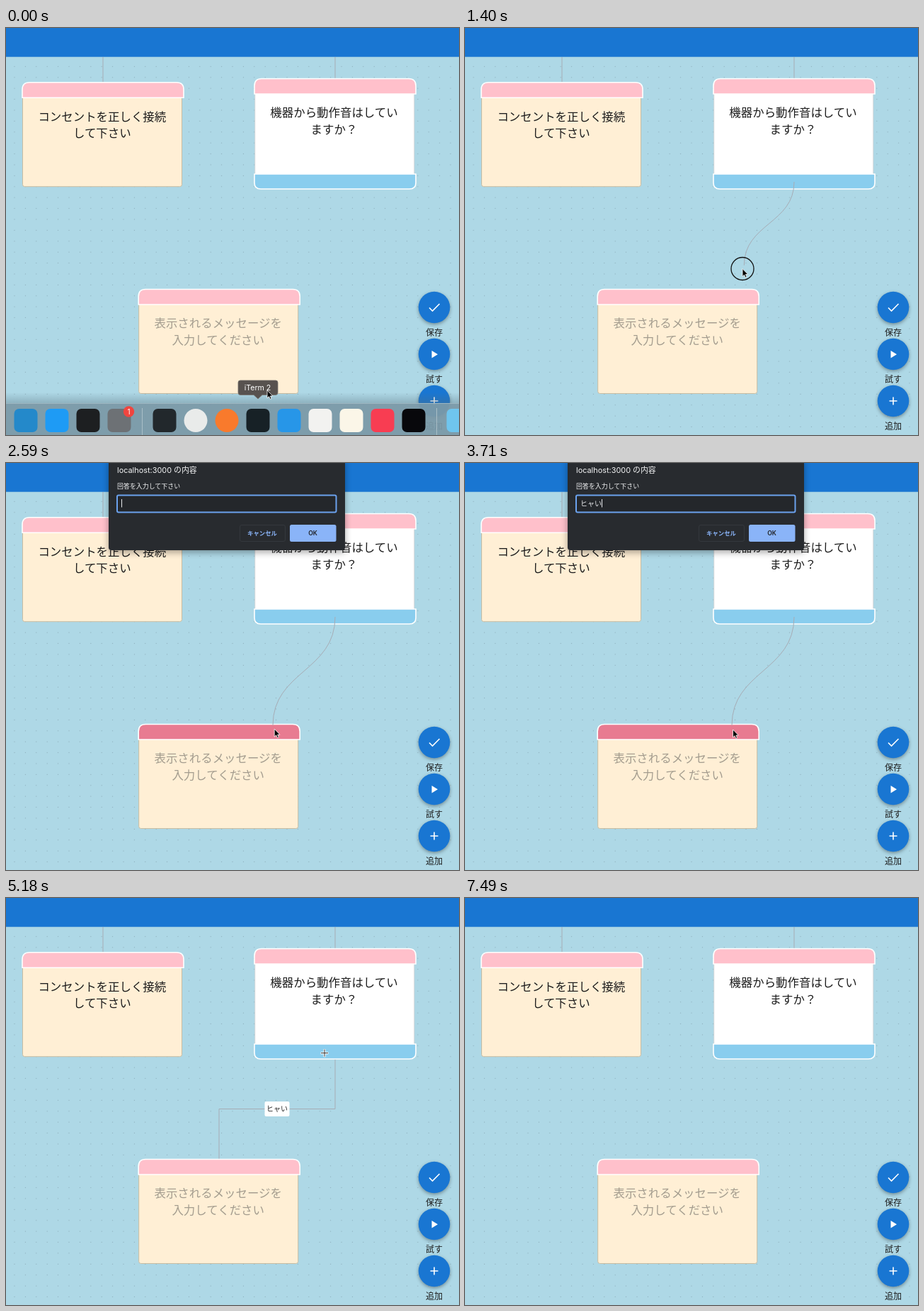
These frames come from a looping animation (640 px wide and 574 px high, 7560 ms). An HTML page:

```html
<!DOCTYPE html>
<html lang="ja">
<head>
<meta charset="utf-8">
<style>
  html, body { margin: 0; width: 100%; height: 100%; overflow: hidden; background: #aed8e6; }
  svg { display: block; width: 640px; height: 574px; font-family: "Noto Sans CJK JP", "Noto Sans CJK", sans-serif; }
  .msg { font-size: 16.45px; font-weight: 350; text-anchor: middle; fill: #1c1c1c; }
  .hint { fill: #a39c8e; }
  .line { fill: none; stroke: #a6acb5; stroke-width: 1; }
  .cap { fill: #ffc0cb; stroke: #fff; stroke-width: 1.6; }
  .cap.hover { fill: #e87b91; }
  .body { fill: #ffefd5; stroke: #c9bda2; stroke-width: 1; }
  .fab { fill: #1976d2; filter: drop-shadow(0 2.5px 2.5px rgba(0, 0, 0, .35)); }
  .small { font-size: 12px; text-anchor: middle; fill: #1c1c1c; }
</style>
</head>
<body>
<svg viewBox="0 0 640 574">
  <defs>
    <pattern id="dots" width="15.4" height="15.4" patternUnits="userSpaceOnUse">
      <circle cx="12" cy="8" r=".65" fill="#88a8b5"/>
    </pattern>
    <linearGradient id="shade" x2="0" y2="1">
      <stop offset="0" stop-color="#546c78" stop-opacity="0"/>
      <stop offset="1" stop-color="#546c78" stop-opacity=".35"/>
    </linearGradient>
    <path id="cap" d="M0 21.5V10Q0 0 10 0H218Q228 0 228 10V21.5Z"/>
  </defs>

  <rect width="640" height="574" fill="#aed8e6"/>
  <rect width="640" height="574" fill="url(#dots)"/>
  <path class="line" d="M137 41V78M465 41V73"/>
  <g id="edge">
    <path class="line" d="M465 217V297.5H301V370"/>
    <rect x="365.5" y="287" width="35" height="21" rx="2" fill="#fff"/>
    <text x="383" y="300.5" font-size="10" text-anchor="middle" fill="#222">ヒャい</text>
  </g>

  <g transform="translate(23 76.7)">
    <rect class="body" x=".5" y="15" width="225" height="132" rx="3"/>
    <use href="#cap" class="cap"/>
    <text class="msg" x="112.8" y="53.9">コンセントを正しく接続</text>
    <text class="msg" x="112.8" y="77.2">して下さい</text>
  </g>
  <g transform="translate(351 71.5)">
    <rect x=".8" y="15" width="225" height="125" fill="#fff" stroke="#d2d2d2" stroke-width=".8"/>
    <use href="#cap" class="cap"/>
    <path d="M0 134.5H228V147Q228 155.5 219 155.5H9Q0 155.5 0 147Z" fill="#89cdee" stroke="#fff" stroke-width="1.6"/>
    <text class="msg" x="112.5" y="53.6">機器から動作音はしてい</text>
    <text class="msg" x="112.5" y="77">ますか？</text>
  </g>
  <g transform="translate(187.2 368.5)">
    <rect class="body" x=".5" y="15" width="225" height="132" rx="3"/>
    <use href="#cap" class="cap" id="target"/>
    <text class="msg hint" x="112.5" y="53.9">表示されるメッセージを</text>
    <text class="msg hint" x="112.5" y="77.2">入力してください</text>
  </g>
  <path class="line" id="wire"/>

  <rect width="640" height="40.7" fill="#1976d2"/>

  <g fill="none" stroke="#fff" stroke-width="1.6">
    <circle class="fab" cx="605" cy="394" r="22.3" stroke="none"/>
    <path d="M598 394.5L602.5 399L612.5 389"/>
    <circle class="fab" cx="605" cy="460" r="22.3" stroke="none"/>
    <path d="M601.5 455V465.5L610 460.2Z" fill="#fff" stroke="none"/>
    <circle class="fab" cx="605" cy="526" r="22.3" stroke="none"/>
    <path d="M605 520.5V531.5M599.5 526H610.5"/>
  </g>
  <text class="small" x="605" y="433.8">保存</text>
  <text class="small" x="605" y="499.8">試す</text>
  <text class="small" x="605" y="565.8">追加</text>

  <g id="dialog">
    <path d="M145 -5H479V119Q479 123 475 123H149Q145 123 145 119Z" fill="#282b2f" style="filter:drop-shadow(0 3px 5px rgba(0,0,0,.35))"/>
    <text x="157" y="14.3" font-size="10.9" fill="#f4f5f6" font-family="Inter, 'Noto Sans CJK JP', sans-serif">localhost:3000 の内容</text>
    <text x="157" y="35.5" font-size="8.95" fill="#f4f5f6">回答を入力して下さい</text>
    <rect x="157" y="45.5" width="309.5" height="24" rx="2" fill="#24272b" stroke="#6ba2ee" stroke-width="2"/>
    <text id="typed" x="163" y="61" font-size="10" fill="#e8eaed"></text>
    <path id="mark" stroke="#e8eaed"/>
    <path id="caret" stroke="#e8eaed"/>
    <rect x="330.5" y="87.5" width="64" height="23" rx="2.5" fill="none" stroke="#34383d"/>
    <text x="362" y="102" font-size="8.4" font-weight="700" text-anchor="middle" fill="#8ab4f8">キャンセル</text>
    <rect x="401" y="87" width="65.5" height="24" rx="2.5" fill="#8ab4f8"/>
    <text x="433.5" y="102" font-size="8.6" font-weight="600" text-anchor="middle" fill="#202124" font-family="Inter, sans-serif">OK</text>
  </g>

  <g id="dock">
    <rect y="514" width="640" height="15" fill="url(#shade)"/>
    <rect y="529" width="640" height="60" fill="#7c9aa8" fill-opacity=".94"/>
    <path d="M0 529.5H640" stroke="#9db6c1"/>
    <path d="M192.5 536V574M608.5 536V574" stroke="#a9bec7"/>
    <g id="apps"></g>
    <circle cx="173.5" cy="541" r="7.7" fill="#f0453f"/>
    <text x="173.5" y="544.8" font-size="10" text-anchor="middle" fill="#fff" font-family="Inter, sans-serif">1</text>
  </g>
  <g id="tip">
    <path d="M331 497H381Q384 497 384 500V514Q384 517.5 381 517.5H362L356 523L350 517.5H331Q328 517.5 328 514V500Q328 497 331 497Z" fill="#57524f" stroke="#77716d" stroke-width=".8"/>
    <text x="355.5" y="511" font-size="10.6" text-anchor="middle" fill="#fff" font-family="Inter, sans-serif">iTerm 2</text>
  </g>

  <g id="pointer">
    <circle id="ring" r="16" fill="none" stroke="#111" stroke-width="1.3"/>
    <path id="arrow" d="M0 0V11L2.5 8.7L4.2 12.4L6 11.6L4.4 8H7.8Z" fill="#000" stroke="#fff" stroke-width=".8"/>
    <g id="cross" fill="none">
      <path d="M-5.5 0H5.5M0 -5.5V5.5" stroke="#fff" stroke-width="3"/>
      <path d="M-5 0H5M0 -5V5" stroke="#333" stroke-width="1"/>
    </g>
  </g>
</svg>
<script>
const LOOP = 7560, STEP = 70;
const el = id => document.getElementById(id);
const show = (id, on) => el(id).style.display = on ? '' : 'none';
const within = (t, a, b) => t >= a && t < b;
const ease = p => p * p * (3 - 2 * p);

// time, x, y of the pointer
const path = [
  [0, 369, 511], [140, 369, 511], [490, 445, 222], [630, 446, 225.5],
  [840, 446, 228], [1400, 392, 339.5], [1750, 378, 373], [2100, 377, 375],
  [2240, 379.3, 375], [3850, 378.5, 376], [4200, 378, 376], [4970, 450, 218],
  [5530, 450, 220], [5670, 448, 225], [6160, 363, 318], [6230, 373, 332],
  [6510, 379, 375], [LOOP, 379, 376]
];
const typing = [
  [2800, 'ｈ'], [2870, 'ｈｙ'], [2940, 'ひゃ'], [3080, 'ひゃい'], [3290, 'ヒャい']
];
const apps = [
  [28, '#2489ca'], [72, '#1e9bf5'], [116, '#1d1f21'], [160, '#6d7175'],
  [224, '#22282c'], [268, '#e9ebea', 1], [312, '#f97a2c', 1], [356, '#172126'],
  [400, '#2796e8'], [444, '#f2f2f0'], [488, '#fbf6e8'], [532, '#f83d52'],
  [576, '#08080c'], [639, '#6fc5ee']
];
el('apps').innerHTML = apps.map(([x, color, round]) =>
  `<rect x="${x - 16.5}" y="537" width="33" height="33" rx="${round ? 16.5 : 7}" fill="${color}"/>`).join('');

function pointAt(t) {
  const i = Math.max(1, path.findIndex(k => k[0] > t));
  const [t0, x0, y0] = path[i - 1], [t1, x1, y1] = path[i];
  const p = ease((t - t0) / (t1 - t0));
  return [x0 + (x1 - x0) * p, y0 + (y1 - y0) * p];
}

function render(t) {
  const [x, y] = pointAt(t);
  const dialog = within(t, 2170, 3780);
  const pressed = within(t, 560, 2100) || within(t, 5600, 6650);
  const wired = within(t, 700, 3780) || within(t, 5670, 6650);
  const visible = t < 7350;
  const onTarget = visible && x > 187 && x < 415 && y > 368 && y < 390;
  const onSource = x > 351 && x < 579 && y > 206 && y < 225;

  el('dock').setAttribute('transform', `translate(0 ${62 * ease(Math.min(1, Math.max(0, (t - 70) / 350)))})`);
  show('tip', t < 140);
  show('edge', within(t, 3780, 6650));
  el('target').classList.toggle('hover', onTarget);

  show('wire', wired);
  const [wx, wy] = t >= 2100 && t < 3780 ? [377, 370] : pointAt(Math.max(0, t - STEP));
  const mid = (217 + wy) / 2;
  el('wire').setAttribute('d', `M465 217C465 ${mid} ${wx} ${mid} ${wx} ${wy}`);

  show('dialog', dialog);
  const typed = typing.filter(k => k[0] <= t).pop();
  const text = typed ? typed[1] : '';
  const end = 163.5 + text.length * 10;
  el('typed').textContent = text;
  el('mark').setAttribute('d', text && t < 3570 ? `M163 63.5H${end}` : '');
  el('caret').setAttribute('d', `M${end} 51V62.5`);

  const cross = !pressed && !dialog && (onTarget || onSource);
  show('pointer', visible);
  show('ring', pressed);
  show('cross', cross);
  show('arrow', !cross);
  el('pointer').setAttribute('transform', `translate(${x} ${y})`);
}

const start = performance.now();
function tick() {
  const t = (performance.now() - start) % LOOP;
  render(Math.floor(t / STEP) * STEP);
  requestAnimationFrame(tick);
}
tick();
</script>
</body>
</html>
```
